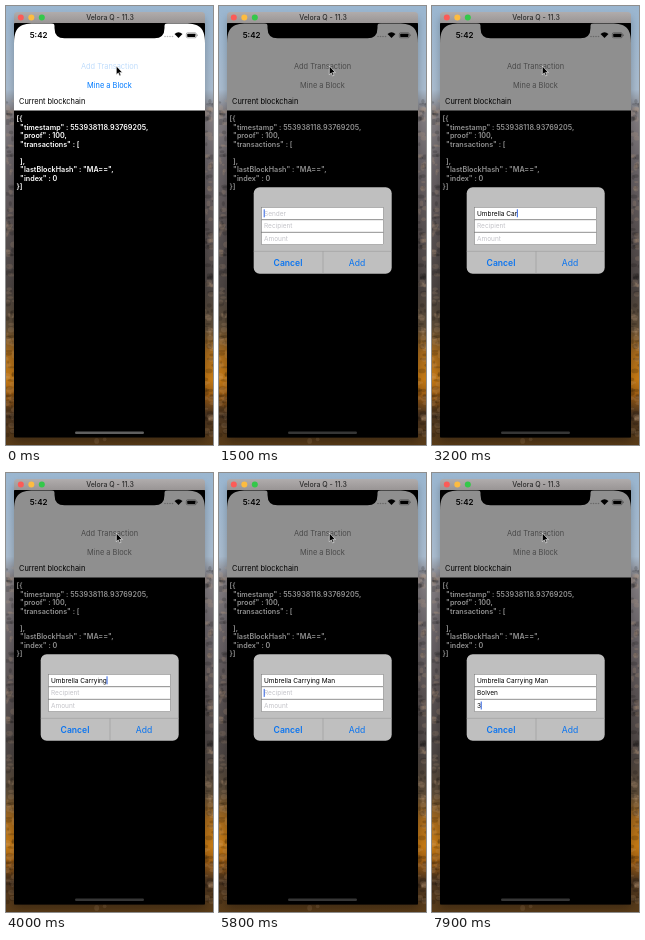
Animation of 207 by 439 pixels, one loop 8 s. Source, as an HTML page:

```html
<!DOCTYPE html>
<html lang="en">
<head>
<meta charset="utf-8">
<title>Add transaction</title>
<style>
  html, body { margin: 0; height: 100%; overflow: hidden; background: #5a5252; }
  svg { display: block; width: 100vw; height: 100vh; }
  text { font-family: Inter, "Liberation Sans", sans-serif; font-size: 7.4px; white-space: pre; }
  .mid { text-anchor: middle; }
  #json text { font-size: 7.2px; font-weight: 600; fill: #fff; }
  #fields text { font-size: 6.5px; }
  .choice { font-size: 8.6px; fill: #0a74f0; }
</style>
</head>
<body>
<svg viewBox="0 0 207 439">
  <defs>
    <linearGradient id="wall" x2="0" y2="1">
      <stop offset="0" stop-color="#9ab6d0"/>
      <stop offset=".19" stop-color="#a9bccf"/>
      <stop offset=".24" stop-color="#858084"/>
      <stop offset=".36" stop-color="#6a6468"/>
      <stop offset=".5" stop-color="#5a5253"/>
      <stop offset=".64" stop-color="#4b4442"/>
      <stop offset=".73" stop-color="#5b4a36"/>
      <stop offset=".79" stop-color="#a5691c"/>
      <stop offset=".85" stop-color="#c67a14"/>
      <stop offset=".89" stop-color="#985a14"/>
      <stop offset=".93" stop-color="#4a3420"/>
      <stop offset="1" stop-color="#5a3c18"/>
    </linearGradient>
    <linearGradient id="bar" x2="0" y2="1">
      <stop offset="0" stop-color="#b0acac"/>
      <stop offset="1" stop-color="#979393"/>
    </linearGradient>
    <filter id="soft" x="-10%" width="120%"><feGaussianBlur stdDeviation="4"/></filter>
  </defs>

  <rect width="207" height="439" fill="url(#wall)"/>
  <g id="rocks"></g>
  <rect x="8" y="12" width="191" height="424" opacity=".25" filter="url(#soft)"/>

  <!-- window -->
  <path d="M8 18V9.500Q8 6 11.500 6H195.500Q199 6 199 9.500V18Z" fill="url(#bar)"/>
  <circle cx="14.800" cy="11.600" r="3" fill="#fc5b57"/>
  <circle cx="25.300" cy="11.600" r="3" fill="#fdbc40"/>
  <circle cx="35.800" cy="11.600" r="3" fill="#34c84a"/>
  <text class="mid" x="104" y="14.200" fill="#2c2c2c" style="font-size:7px;font-weight:500">Velora Q - 11.3</text>
  <rect x="8" y="17" width="191" height="414.500" rx="1"/>

  <!-- app -->
  <path d="M8 104.600V38C8 22 13 17.500 28 17.500H179C194 17.500 199 22 199 38V104.600Z" fill="#fff"/>
  <path d="M45 17Q48.500 17 48.500 20V22Q48.500 32.300 58.500 32.300H148.500Q158.500 32.300 158.500 22V20Q158.500 17 162 17Z"/>
  <text x="23.700" y="32" style="font-size:8px;font-weight:600">5:42</text>
  <g fill="#b8b8b8">
    <circle cx="159" cy="30.500" r=".8"/><circle cx="161.500" cy="30.500" r=".8"/>
    <circle cx="164" cy="30.500" r=".8"/><circle cx="166.500" cy="30.500" r=".8"/>
  </g>
  <path d="M172.500 32L168.500 28Q172.500 24.700 176.500 28Z"/>
  <rect x="180.300" y="26.800" width="10" height="5" rx="1.300" fill="none" stroke="#777" stroke-width=".6"/>
  <rect x="181.200" y="27.700" width="8.200" height="3.200" rx=".6"/>
  <path d="M191.300 28.500v1.600" stroke="#777" stroke-width=".7"/>
  <text x="13" y="98">Current blockchain</text>
  <g id="json"></g>
  <rect x="69" y="425.500" width="69" height="2.400" rx="1.200" fill="#606060"/>

  <rect id="dim" x="8" y="17" width="191" height="414.500"/>
  <text id="addTx" class="mid" x="103.500" y="62.500">Add Transaction</text>
  <text id="mine" class="mid" x="103.500" y="81.500">Mine a Block</text>

  <!-- alert -->
  <g id="alert">
    <rect x="34.700" y="181.200" width="138" height="86.600" rx="6" fill="#bfbfbf"/>
    <path d="M34.700 245.300H172.700M104 245.300V267.800" stroke="#999" stroke-width=".6"/>
    <g id="fields"></g>
    <rect id="caret" width="1" height="8" fill="#2f62e0"/>
    <text class="mid choice" x="69" y="260" font-weight="600">Cancel</text>
    <text class="mid choice" x="138" y="260">Add</text>
  </g>

  <path d="M110.300 60V68.700L112.300 66.900L113.600 69.900L115 69.300L113.700 66.400H116.400Z"
        stroke="#fff" stroke-width=".6"/>
</svg>
<script>
const LOOP = 8000;
const $ = id => document.getElementById(id);
const make = (parent, tag, attrs, text = "") => {
  const el = document.createElementNS("http://www.w3.org/2000/svg", tag);
  for (const key in attrs) el.setAttribute(key, attrs[key]);
  el.textContent = text;
  parent.append(el);
  return el;
};

// rough texture below the sky, visible along the window's edges
let seed = 7;
const random = () => (seed = seed * 16807 % 2147483647) / 2147483647;
for (let i = 0; i < 260; i++) {
  const y = 95 + random() * 344;
  const x = y > 430 ? random() * 207 : random() * 8 + (i % 2) * 199;
  make($("rocks"), "ellipse", { cx: x, cy: y, rx: 1 + random() * 3, ry: 1 + random() * 2,
    fill: random() < .5 ? "#000" : "#d9b48c", opacity: .16 });
}

const block = ['[{', '  "timestamp" : 553938118.93769205,', '  "proof" : 100,',
  '  "transactions" : [', '', '  ],', '  "lastBlockHash" : "MA==",', '  "index" : 0', '}]'];
block.forEach((line, i) => make($("json"), "text", { x: 10.5, y: 115 + i * 8.5 }, line));

// focus: when the field becomes active; start, step: typing schedule in ms
const fields = [
  { hint: "Sender", value: "Umbrella Carrying Man", focus: 400, start: 1600, step: 145 },
  { hint: "Recipient", value: "Bolven", focus: 4800, start: 6150, step: 150 },
  { hint: "Amount", value: "3", focus: 7250, start: 7600, step: 150 }
];
fields.forEach((f, i) => {
  f.y = 201.3 + i * 12.6;
  make($("fields"), "rect", { x: 42.5, y: f.y, width: 122, height: 12.2,
    fill: "#fff", stroke: "#777", "stroke-width": .5 });
  f.text = make($("fields"), "text", { x: 45, y: f.y + 8.5 });
});

const clamp = x => Math.min(1, Math.max(0, x));
const mix = (a, b, p) => `rgb(${a.map((v, i) => Math.round(v + (b[i] - v) * p))})`;

function draw(t) {
  const shown = 1 - (1 - clamp((t - 150) / 600)) ** 3;
  const scale = 1 + .2 * (1 - shown);
  $("dim").setAttribute("opacity", .44 * shown);
  $("addTx").setAttribute("fill", mix([192, 221, 252], [74, 74, 74], shown));
  $("mine").setAttribute("fill", mix([0, 122, 255], [74, 74, 74], shown));
  $("alert").setAttribute("opacity", clamp(shown * 1.3));
  $("alert").setAttribute("transform",
    `translate(103.75 224.5) scale(${scale}) translate(-103.75 -224.5)`);

  let active = fields[0];
  for (const f of fields) {
    f.count = Math.min(f.value.length, Math.max(0, Math.floor((t - f.start) / f.step) + 1));
    f.text.textContent = f.count ? f.value.slice(0, f.count) : f.hint;
    f.text.setAttribute("fill", f.count ? "#000" : "#c3c3c8");
    if (t >= f.focus) active = f;
  }

  const { count, start, step, focus, y, text } = active;
  const idle = t - (count ? start + (count - 1) * step : focus);
  $("caret").setAttribute("x", 44.7 + (count ? text.getComputedTextLength() : 0));
  $("caret").setAttribute("y", y + 2);
  $("caret").setAttribute("opacity", idle >= 0 && idle % 1000 < 550 ? 1 : 0);
}

const begin = performance.now();
function tick() {
  draw((performance.now() - begin) % LOOP);
  requestAnimationFrame(tick);
}
tick();
</script>
</body>
</html>
```
